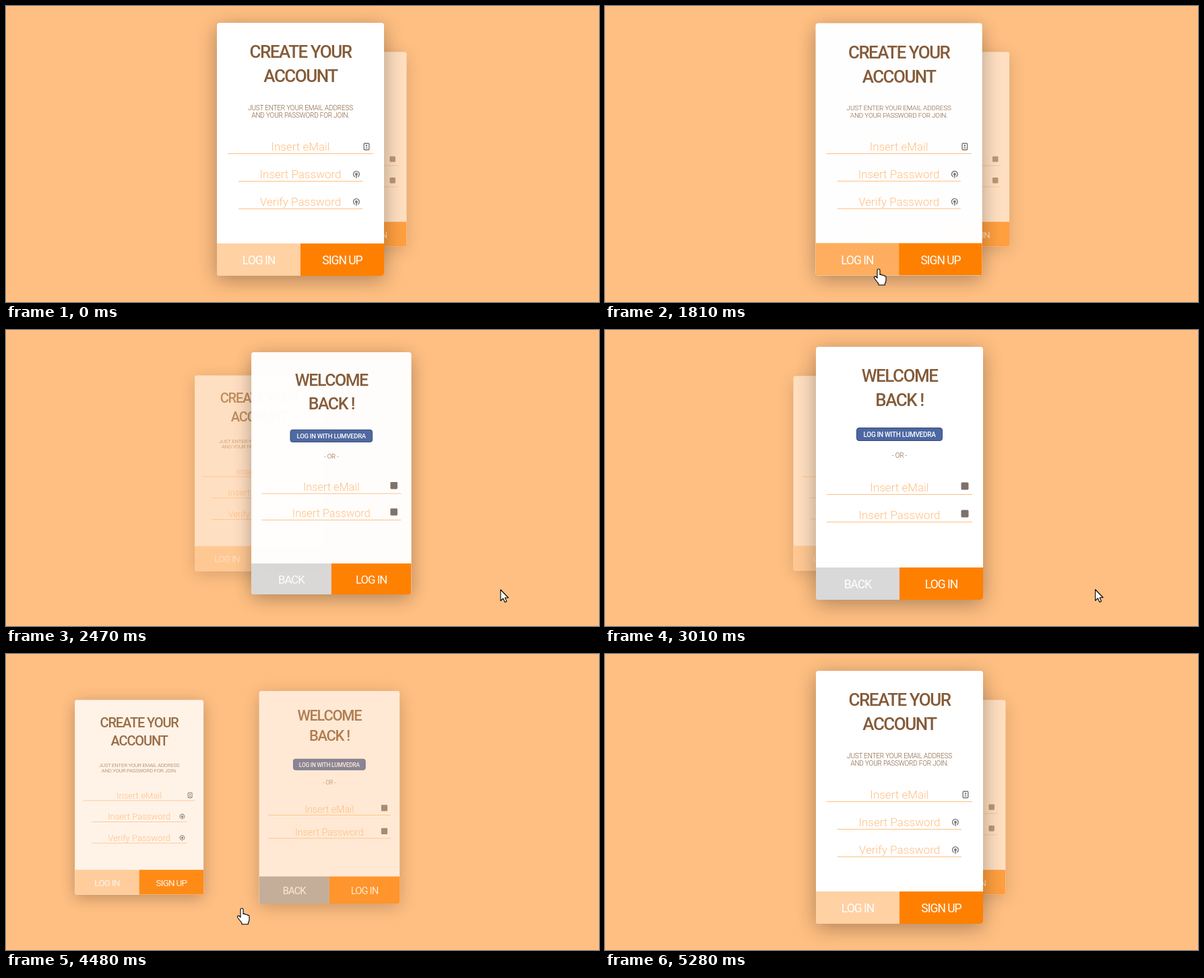
Write an HTML page that moves like this. It is 880 px wide and 440 px high and loops after 6.47 s.

```html
<!DOCTYPE html>
<html lang="en">
<head>
<meta charset="utf-8">
<title>Account cards</title>
<style>
  html, body { margin: 0; width: 100%; height: 100%; overflow: hidden; background: #ffbf82; }
  .card {
    position: absolute; left: 313px; top: 25px; width: 248px; height: 376px;
    border-radius: 4px; background: #fff; box-shadow: 0 6px 30px rgba(0, 0, 0, .32);
  }
  .card svg { display: block; border-radius: 4px; }
  #pointer { position: absolute; left: 0; top: 0; z-index: 5; }
  text { font-family: Roboto, sans-serif; text-anchor: middle; white-space: pre; }
  .title { font-size: 26px; font-weight: 500; letter-spacing: -1.5px; fill: #845b38; }
  .note { font-size: 10px; font-weight: 300; letter-spacing: -.2px; fill: #845b38; }
  .hint { font-size: 17px; font-weight: 300; fill: #ffbf82; }
  .social { font-size: 10px; font-weight: 500; letter-spacing: -.3px; fill: #fff; }
  .label { font-size: 17.5px; letter-spacing: -1px; fill: #fff; }
  .line { stroke: #ffbf82; }
  .icon { fill: none; stroke: #777; stroke-width: 1.4; }
  #pointer path { fill: #fff; stroke: #000; stroke-width: 1.1; stroke-linejoin: round; }
</style>
</head>
<body>
<div class="card" id="signIn"></div>
<div class="card" id="signUp"></div>
<svg id="pointer" width="880" height="440">
  <path id="arrow" d="M0 0V16.5L3.8 13L6.4 18.8L9 17.6L6.5 12H11.5Z"/>
  <path id="hand" d="M-2 2a2 2 0 0 1 4 0v6.5q2-1 3.2.8q2-.8 3 .9q2.6-.5 2.8 2v4.5q0 3-1.6 4.6v2.5h-9.4v-2q-3-3.5-5.8-7.5q-1.6-2.5.5-3.2q1.5-.2 3.3 2.2z"/>
</svg>
<script>
const LOOP = 6470, MOVE = 900, SHRINK = 810;
const TO_SIGN_IN = 1790, TO_SIGN_UP = 4152;
const byId = id => document.getElementById(id);

// Card contents
const text = (kind, x, y, words) => `<text class="${kind}" x="${x}" y="${y}">${words}</text>`;
const box = (x, y, w, h, fill, extra = '') =>
  `<rect x="${x}" y="${y}" width="${w}" height="${h}" fill="${fill}" ${extra}/>`;
const field = (y, inset, words, icon) =>
  text('hint', 124, y - 4.5, words) +
  `<path class="line" d="M${inset} ${y}H${248 - inset}"/>` +
  `<g transform="translate(${icon.x} ${y + icon.dy})">${icon.shape}</g>`;
const footer = (idle, hover, left, right) =>
  box(0, 328, 124, 48, idle) + box(0, 328, 124, 48, hover, 'class="hover" opacity="0"') +
  box(124, 328, 124, 48, '#ff8000') +
  text('label', 62, 359.2, left) + text('label', 186, 359.2, right);
const titles = (a, b) => text('title', 124, 52.3, a) + text('title', 124, 88.3, b);
const fill = (card, content) =>
  card.innerHTML = `<svg width="248" height="376">${content}</svg>`;

const contact = { x: 222, dy: -10.5, shape:
  '<rect class="icon" x="-3.8" y="-4.8" width="7.6" height="9.6" rx="1"/>' +
  '<circle cy="-1.4" r="1.3" fill="#777"/><path d="M-2.3 2.6q2.3-3 4.6 0z" fill="#777"/>' };
const lock = { x: 207, dy: -10.5, shape:
  '<path class="icon" d="M-2 4A4.4 4.4 0 1 1 2.2 3.8M0 0V6"/><circle r="2" fill="#777"/>' };
const square = { x: 221, dy: -12.5, shape: box(-5.5, -5.5, 11, 11, '#7d716a', 'rx="1.5"') };

const signUp = byId('signUp'), signIn = byId('signIn');
fill(signUp,
  titles('CREATE YOUR', 'ACCOUNT') +
  text('note', 124, 129.5, 'JUST ENTER YOUR EMAIL ADDRESS') +
  text('note', 124, 140.5, 'AND YOUR PASSWORD FOR JOIN.') +
  field(194.5, 16, 'Insert eMail', contact) +
  field(235.5, 32, 'Insert Password', lock) +
  field(276.5, 32, 'Verify Password', lock) +
  footer('#ffd1a3', '#ffad5e', 'LOG IN', 'SIGN UP'));
fill(signIn,
  titles('WELCOME', 'BACK !') +
  box(60.5, 120.5, 127, 19, '#4c67a1', 'rx="3.5" stroke="#34497d"') +
  text('social', 124, 134, 'LOG IN WITH LUMVEDRA') +
  text('note', 124, 165, '- OR -') +
  field(219.5, 16, 'Insert eMail', square) +
  field(260.5, 16, 'Insert Password', square) +
  footer('#d9d9d9', '#a6a6a6', 'BACK', 'LOG IN'));

// Motion
const clamp = v => Math.min(1, Math.max(0, v));
const ramp = (t, from, to) => clamp((t - from) / (to - from));

// cubic-bezier(.25, .1, .25, 1)
function ease(x) {
  x = clamp(x);
  let lo = 0, hi = 1;
  for (let i = 0; i < 24; i++) {
    const s = (lo + hi) / 2;
    if (.75 * s * (1 - s) + s ** 3 < x) lo = s; else hi = s;
  }
  return .3 * lo * (1 - lo) ** 2 + 3 * lo * lo * (1 - lo) + lo ** 3;
}

function place(card, x, scale, opacity, z) {
  card.style.transform = `translateX(${x}px) scale(${scale})`;
  card.style.opacity = opacity;
  card.style.zIndex = z;
}

function leave(card, side, elapsed) {
  const p = ease(elapsed / SHRINK);
  place(card, side * 62 * p, 1 - .23 * p, 1 - .5 * p, 1);
}

// Swings out to the side behind the other card, then comes in on top of it.
function enter(card, side, elapsed) {
  const half = elapsed / MOVE * 2;
  const out = ease(half), back = ease(half - 1);
  const x = (62 + 186 * out) * (1 - back);
  place(card, side * x, .77 + .23 * back, .5 + .5 * ease(elapsed / MOVE), half < 1 ? 0 : 2);
}

// Pointer stops: time, x, y, ease-out power of the way there
const stops = [
  [920, 404, 440, 1], [1340, 406, 391, 1.5], [1850, 406, 391, 1], [2400, 734, 386, 2],
  [3000, 734, 386, 1], [3610, 379, 372, 1], [3680, 350, 378, 1],
  [4840, 350, 378, 1], [5280, 352, 442, 1]
];

function movePointer(t) {
  const next = stops.findIndex(stop => stop[0] > t);
  byId('pointer').style.display = next > 0 ? '' : 'none';
  if (next < 1) return;
  const [t0, x0, y0] = stops[next - 1], [t1, x1, y1, power] = stops[next];
  const p = 1 - (1 - ramp(t, t0, t1)) ** power;
  const x = x0 + (x1 - x0) * p, y = y0 + (y1 - y0) * p;
  const isHand = x < 561 && y < 401;
  for (const id of ['arrow', 'hand']) {
    byId(id).setAttribute('transform', `translate(${x} ${y})`);
    byId(id).style.display = (id === 'hand') === isHand ? '' : 'none';
  }
}

const setHover = (card, amount) =>
  card.querySelector('.hover').setAttribute('opacity', amount);

function draw() {
  const t = performance.now() % LOOP;
  if (t < 3400) {
    leave(signUp, -1, t - TO_SIGN_IN);
    enter(signIn, 1, t - TO_SIGN_IN);
  } else {
    leave(signIn, 1, t - TO_SIGN_UP);
    enter(signUp, -1, t - TO_SIGN_UP);
  }
  setHover(signUp, ramp(t, 1080, 1330) - ramp(t, 2080, 2420)
    + .6 * (ramp(t, 4820, 4960) - ramp(t, 5020, 5260)));
  setHover(signIn, ramp(t, 4190, 4400) - ramp(t, 5000, 5260));
  movePointer(t);
  requestAnimationFrame(draw);
}
draw();
</script>
</body>
</html>
```
